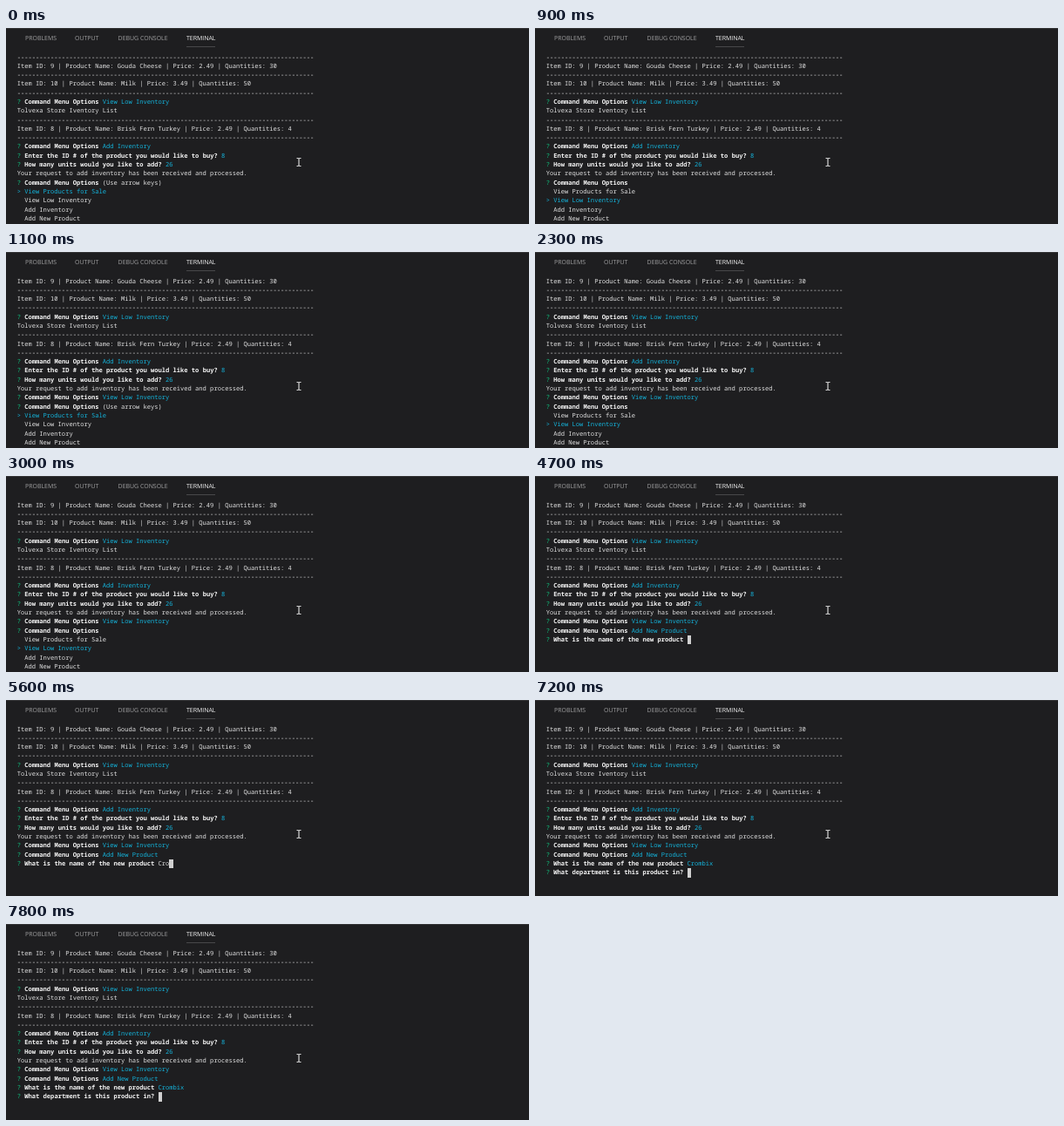
These frames come from a looping animation (600x225 px, 8000 ms). An HTML page:

```html
<!DOCTYPE html>
<html lang="en">
<head>
<meta charset="utf-8">
<style>
  html, body { margin: 0; width: 100%; height: 100%; overflow: hidden; background: #1e1e20; }
  body { position: relative; text-rendering: geometricPrecision; }
  body::before { content: ""; position: absolute; left: 0; right: 0; top: 0; height: 1px; background: #343436; }
  .tab { position: absolute; top: 8px; font: 6.96px/10px "Open Sans", sans-serif; color: #a0a0a1; white-space: pre; }
  .active { color: #f4f4f4; height: 13px; border-bottom: 1px solid #48484a; }
  #term {
    position: absolute; left: 12.8px; top: 28.5px; margin: 0; color: #e2e2e2;
    font: 500 7.105px/10.3px "Noto Sans Mono", monospace; font-variant-ligatures: none;
  }
  #term div { height: 10.3px; }
  b { color: #f4f4f4; }
  i { font-style: normal; color: #14b4dc; }
  u { text-decoration: none; color: #0fc47f; }
  s { display: inline-block; width: 1ch; height: 10.3px; vertical-align: top; background: #d0d0d0; }
  svg { position: absolute; left: 331.6px; top: 148px; }
</style>
</head>
<body>
<div class="tab" style="left:22px">PROBLEMS</div>
<div class="tab" style="left:79px">OUTPUT</div>
<div class="tab" style="left:128.6px">DEBUG CONSOLE</div>
<div class="tab active" style="left:207px">TERMINAL</div>
<pre id="term"></pre>
<svg width="8" height="12" fill="none">
  <path d="M1.5 1.5H3L4 2.3 5 1.5H6.5M4 2.3V9.7M1.5 10.5H3L4 9.7 5 10.5H6.5" stroke="#d8d8d8" stroke-width="1.2"/>
</svg>
<script>
const LOOP = 8000;
const term = document.getElementById("term");
const rule = "-".repeat(80);
const options = ["View Products for Sale", "View Low Inventory", "Add Inventory", "Add New Product"];
const product = "Crombix";
const keyTimes = [5200, 5400, 5600, 5700, 5900, 6000, 6200];

const item = (id, name, price, count) =>
  `Item ID: ${id} | Product Name: ${name} | Price: ${price} | Quantities: ${count}`;
const ask = (question, rest = "") => `<u>?</u> <b>${question}</b> ${rest}`;
const answer = (question, text) => ask(question, `<i>${text}</i>`);
const command = text => answer("Command Menu Options", text);

const menu = (chosen, hint) => [
  ask("Command Menu Options", hint ? "(Use arrow keys)" : ""),
  ...options.map((text, i) => i === chosen ? `<i>&gt; ${text}</i>` : "  " + text)
];

const log = [
  rule,
  item(9, "Gouda Cheese", "2.49", 30),
  rule,
  item(10, "Milk", "3.49", 50),
  rule,
  command(options[1]),
  "Tolvexa Store Iventory List",
  rule,
  item(8, "Brisk Fern Turkey", "2.49", 4),
  rule,
  command(options[2]),
  answer("Enter the ID # of the product you would like to buy?", 8),
  answer("How many units would you like to add?", 26),
  "Your request to add inventory has been received and processed."
];

const passed = (t, times) => times.filter(x => t >= x).length;

function screen(t) {
  if (t < 1100) return [...log, ...menu(passed(t, [500]), t < 500)];
  const rows = [...log.slice(1), command(options[1])];
  if (t < 4300) return [...rows, ...menu(passed(t, [2300, 3200, 3700]), t < 2300)];
  rows.push(command(options[3]));
  const question = "What is the name of the new product";
  if (t < 7100) return [...rows, ask(question, product.slice(0, passed(t, keyTimes)) + "<s></s>")];
  return [...rows, answer(question, product), ask("What department is this product in?", "<s></s>")];
}

let shown = "";
function draw(now) {
  const html = screen(now % LOOP).map(row => `<div>${row}</div>`).join("");
  if (html !== shown) term.innerHTML = shown = html;
  requestAnimationFrame(draw);
}
draw(0);
</script>
</body>
</html>
```
